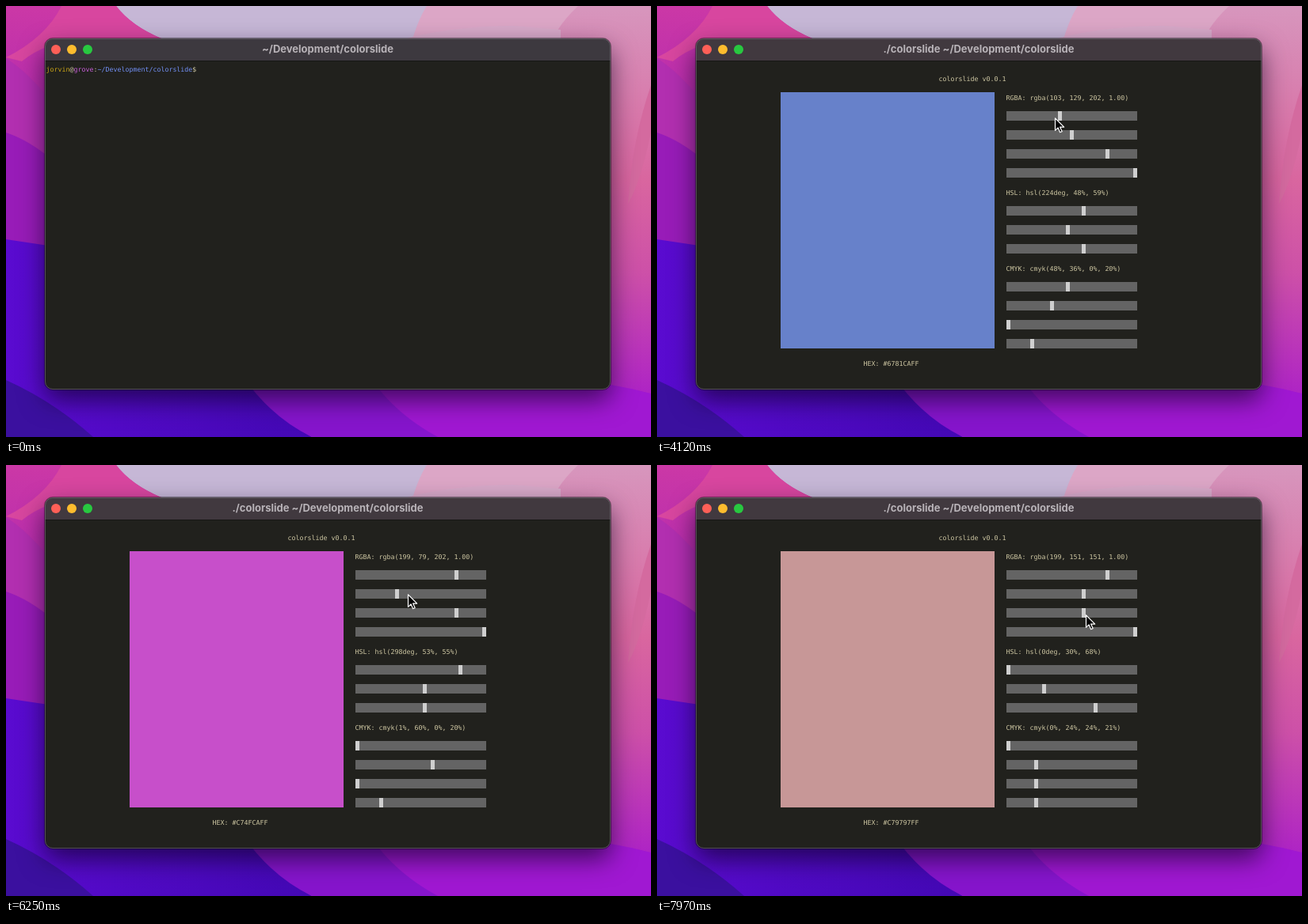
These frames come from a looping animation (814x545 px, 8 s). An HTML page:

```html
<!DOCTYPE html>
<html lang="en">
<head>
<meta charset="utf-8">
<title>colorslide</title>
<style>
  html, body { margin: 0; width: 100%; height: 100%; overflow: hidden; background: #7a18c0; }
  svg { display: block; }
  .mono { font: 8.305px "DejaVu Sans Mono", monospace; fill: #cdc6a2; text-rendering: geometricPrecision; }
  #title { font: 700 13px Inter, sans-serif; fill: #b8b3b8; text-anchor: middle; }
  #shadow { filter: drop-shadow(0 13px 16px rgba(10, 0, 30, .65)); }
</style>
</head>
<body>
<svg width="814" height="545" viewBox="0 0 814 545">
  <defs>
    <linearGradient id="right" x2="0" y2="1">
      <stop offset="0" stop-color="#d796bd"/>
      <stop offset=".4" stop-color="#d9669f"/>
      <stop offset=".62" stop-color="#cd50a8"/>
      <stop offset="1" stop-color="#a314cf"/>
    </linearGradient>
    <linearGradient id="left" x2="0" y2="1">
      <stop offset="0" stop-color="#cb38a6"/>
      <stop offset="1" stop-color="#9a1bbb"/>
    </linearGradient>
    <linearGradient id="floor">
      <stop offset="0" stop-color="#5a0bd0"/>
      <stop offset="1" stop-color="#4308b4"/>
    </linearGradient>
  </defs>

  <!-- Wallpaper -->
  <path fill="url(#right)" d="M0 0H814V545H0z"/>
  <path fill="#dca6c6" d="M530 0H722Q690 30 684 60H490z"/>
  <path fill="#c6b7d6" d="M130 0H531Q518 20 508 60H180z"/>
  <path fill="#d7a9c8" d="M506 41Q560 26 640 25L700 30V60H500z"/>
  <path fill="#d46a9f" d="M814 100Q790 170 785 250Q800 225 814 160z"/>
  <path fill="url(#left)" d="M0 0H139Q158 25 196 41V310H0z"/>
  <path fill="#d8469f" d="M70 0H139Q158 25 196 41H100Q50 45 20 70L0 65Q50 40 70 0z"/>
  <path fill="#b22fb0" d="M0 66Q30 85 60 125V200L0 160z"/>
  <path fill="#981cb8" d="M0 160Q30 170 60 196V310L0 296z"/>
  <path fill="url(#floor)" d="M0 295L60 304L300 470Q340 520 386 545H0z"/>
  <path fill="#8615cc" d="M300 470Q335 520 386 545H560L460 470z"/>
  <path fill="#a018d2" d="M460 470Q490 515 545 545H814V490Q680 455 460 470z"/>
  <path fill="#3b109f" d="M0 473Q60 500 110 545H0z"/>

  <!-- Window -->
  <rect id="shadow" x="49" y="41" width="714" height="444" rx="10" fill="#21211d"/>
  <path id="bar" d="M49 69V51a10 10 0 0 1 10-10H753a10 10 0 0 1 10 10V69z"/>
  <path stroke="#161614" d="M49 69.5H763"/>
  <rect x="48.5" y="40.5" width="715" height="445" rx="10.5" fill="none" stroke="#000" stroke-opacity=".4"/>
  <rect x="49.5" y="41.5" width="713" height="443" rx="9.5" fill="none" stroke="#77707a" stroke-opacity=".6"/>
  <circle cx="63" cy="55" r="6" fill="#ff5f57"/>
  <circle cx="83" cy="55" r="6" fill="#febc2e"/>
  <circle cx="103" cy="55" r="6" fill="#28c840"/>
  <text id="title" x="406" y="59"></text>

  <text id="prompt" class="mono" x="50.5" y="83"><tspan fill="#c9a416">jorvin</tspan>@<tspan fill="#c75fd8">grove</tspan>:<tspan fill="#7290f5">~/Development/colorslide</tspan>$&#160;<tspan id="typed"></tspan></text>

  <g id="app">
    <text class="mono" x="355.5" y="95">colorslide v0.0.1</text>
    <rect id="swatch" x="156" y="109" width="270" height="324"/>
    <text id="hex" class="mono" x="260.5" y="455"></text>
  </g>
  <path id="pointer" fill="#000" stroke="#fff" stroke-width="1.2" stroke-linejoin="round"
    d="M.5 .8V16.4L4.1 13L6.6 18.7L9.1 17.6L6.6 12.1H11.7z"/>
</svg>
<script>
const LOOP = 8000, LAUNCH = 1950, FRAME = 60, LAG = 100;
const CELL = 5, ROW = 12, BAR_X = 441, STEPS = 32;
const COMMAND = './colorslide', FOLDER = '~/Development/colorslide';
const $ = id => document.getElementById(id);

function add(tag, attrs) {
  const el = document.createElementNS('http://www.w3.org/2000/svg', tag);
  for (const name in attrs) el.setAttribute(name, attrs[name]);
  return $('app').appendChild(el);
}

// Each group is a label followed by its sliders, one every second row
const labels = [], knobs = [];
let y = 109;
for (const count of [4, 3, 4]) {
  labels.push(add('text', { class: 'mono', x: BAR_X - .5, y: y + 10 }));
  for (let i = 0; i < count; i++) {
    y += 2 * ROW;
    const bar = { x: BAR_X, y, height: ROW };
    add('rect', { ...bar, width: CELL * (STEPS + 1), fill: '#646464' });
    knobs.push(add('rect', { ...bar, width: CELL, fill: '#cfcfcf' }));
  }
  y += 2 * ROW;
}

// Turning points of the pointer: time, x, y
const path = [
  [2780, 575, 535], [3300, 480, 200], [3580, 521, 143],
  [3820, 521, 142], [4500, 472, 139], [4690, 497, 138], [4950, 568, 140],
  [5200, 568, 142], [5500, 522, 162], [6010, 480, 163], [6500, 537, 163],
  [6720, 568, 183], [7020, 556, 183], [7330, 508, 186], [7960, 541, 189]
];
function pointerAt(t) {
  const next = path.findIndex(p => p[0] > t);
  if (next < 1) return path.at(next).slice(1);
  const a = path[next - 1], b = path[next], k = (t - a[0]) / (b[0] - a[0]);
  return [1, 2].map(i => a[i] + (b[i] - a[i]) * k);
}

// One drag per channel; the knob follows the pointer with a delay
const drags = [
  { initial: 130, start: 3880, end: 5050 },
  { initial: 129, start: 5600, end: 6600 },
  { initial: 202, start: 6900, end: LOOP }
];
function channel({ initial, start, end }, t) {
  if (t < start) return initial;
  const [x] = pointerAt(Math.min(t, end) - LAG);
  return Math.floor((x - BAR_X) / CELL) * 255 / STEPS;
}

function toHsl([r, g, b]) {
  const max = Math.max(r, g, b), min = Math.min(r, g, b), d = max - min, sum = max + min;
  const h = !d ? 0 : max === r ? ((g - b) / d + 6) % 6 : max === g ? (b - r) / d + 2 : (r - g) / d + 4;
  return [h / 6, d && d / (sum > 255 ? 510 - sum : sum), sum / 510];
}
function toCmyk(rgb) {
  const max = Math.max(...rgb);
  return [...rgb.map(v => (max - v) / max), 1 - max / 255];
}
const scale = (v, n) => Math.floor(v * n + 1e-9);
const percents = list => list.map(v => scale(v, 100) + '%').join(', ');

function drawApp(t) {
  const rgb = drags.map(d => channel(d, t)), hsl = toHsl(rgb), cmyk = toCmyk(rgb);
  const bytes = rgb.map(Math.floor);
  const hex = bytes.map(v => v.toString(16).padStart(2, '0')).join('').toUpperCase();
  $('swatch').setAttribute('fill', '#' + hex);
  $('hex').textContent = `HEX: #${hex}FF`;
  labels[0].textContent = `RGBA: rgba(${bytes.join(', ')}, 1.00)`;
  labels[1].textContent = `HSL: hsl(${scale(hsl[0], 360)}deg, ${percents(hsl.slice(1))})`;
  labels[2].textContent = `CMYK: cmyk(${percents(cmyk)})`;
  [...rgb.map(v => v / 255), 1, ...hsl, ...cmyk].forEach((v, i) =>
    knobs[i].setAttribute('x', BAR_X + CELL * scale(v, STEPS)));
}

// Three keys, then tab completion
function typedAt(t) {
  const keys = [810, 870, 1050].filter(at => t >= at).length;
  return COMMAND.slice(0, t < 1350 ? keys : COMMAND.length);
}

function draw(now) {
  const t = now % LOOP, running = t >= LAUNCH;
  const tick = Math.floor((t + FRAME / 6) / FRAME) * FRAME;
  const show = (id, on) => $(id).setAttribute('visibility', on ? 'visible' : 'hidden');
  show('app', running);
  show('prompt', !running);
  show('pointer', t >= path[0][0]);
  $('title').textContent = running ? `${COMMAND} ${FOLDER}` : FOLDER;
  $('bar').setAttribute('fill', running ? '#41393f' : '#3d393f');
  $('typed').textContent = typedAt(t);
  $('pointer').setAttribute('transform', `translate(${pointerAt(tick).map(Math.round)})`);
  if (running) drawApp(tick);
}

const begin = performance.now();
(function frame() {
  draw(performance.now() - begin);
  requestAnimationFrame(frame);
})();
</script>
</body>
</html>
```
